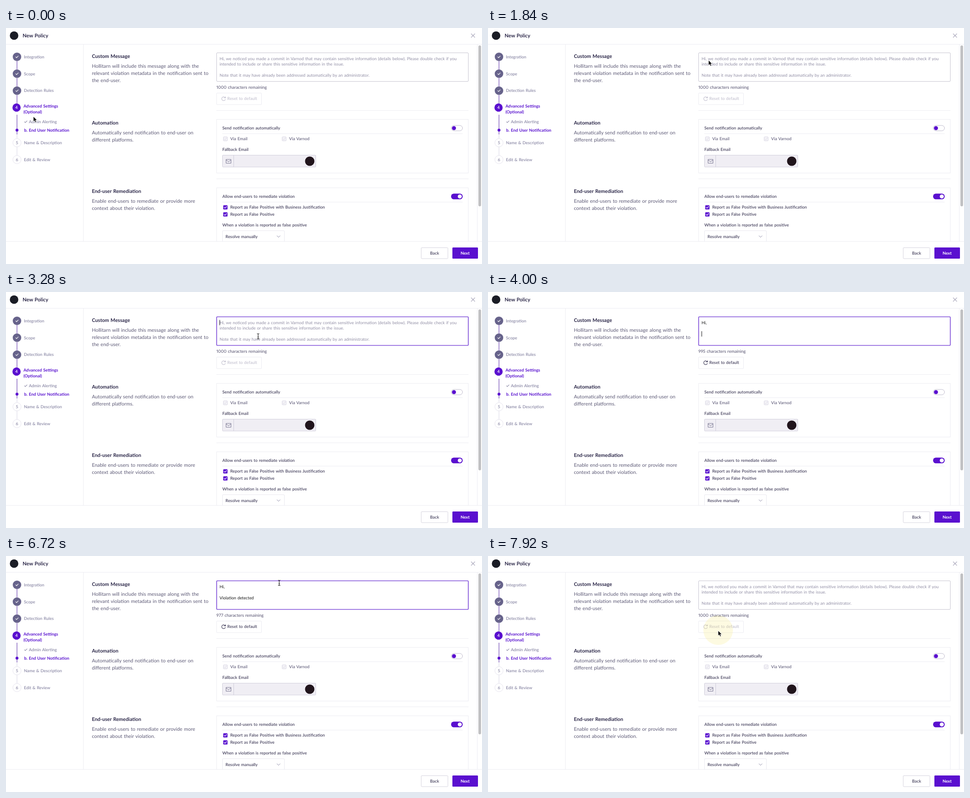
An HTML page for the animation above (8000 ms loop, 1061x528 px).

```html
<!DOCTYPE html>
<html lang="en">
<head>
<meta charset="utf-8">
<title>New Policy</title>
<style>
html, body { margin: 0; width: 100%; height: 100%; overflow: hidden; background: #fff; }
svg { display: block; width: 1061px; height: 528px; }
text {
  font: 600 9.3px Lato, "Open Sans", sans-serif;
  word-spacing: .07em; white-space: pre;
  text-rendering: geometricPrecision; fill: #47435f;
}
.line { fill: none; stroke: #ececf2; }
.head { font-size: 11.1px; font-weight: 700; fill: #2b2748; }
.title { font-size: 11.3px; }
.body { font-size: 10.95px; font-weight: 400; fill: #5d5a76; }
.nav { fill: #8b89a6; }
.now { fill: #5a14cf; font-weight: 700; }
.hint { font-size: 9.36px; font-weight: 400; fill: #918ea5; }
.typed { font-size: 9.36px; font-weight: 400; fill: #111; }
.count { font-size: 9.45px; font-weight: 500; font-variant-numeric: proportional-nums; fill: #5d5a76; }
.mid { text-anchor: middle; }
.fill { fill: #5a10cf; }
.tick { fill: none; stroke-width: 1.2; stroke-linecap: round; stroke-linejoin: round; }
</style>
</head>
<body>
<svg viewBox="0 0 1061 528" xmlns="http://www.w3.org/2000/svg">
  <defs>
    <path id="tick" d="M-2.8 .1L-.9 2 2.8 -1.9"/>
    <g id="done">
      <circle r="9.5" fill="#67638b"/>
      <use href="#tick" class="tick" stroke="#fff"/>
    </g>
    <g id="checked">
      <rect x="-4.8" y="-4.8" width="9.6" height="9.6" rx="1.6" class="fill"/>
      <use href="#tick" class="tick" stroke="#fff"/>
    </g>
    <g id="unchecked">
      <rect x="-4.5" y="-4.5" width="9" height="9" rx="1.5" fill="#f5f4f8" stroke="#d9d7e3"/>
      <use href="#tick" class="tick" stroke="#e3e1ea"/>
    </g>
    <clipPath id="pane"><rect x="173" y="37" width="878" height="440"/></clipPath>
  </defs>

  <!-- header and frame -->
  <circle cx="18" cy="17" r="9.5" fill="#1b1d26"/>
  <text class="head title" x="37" y="20.8">New Policy</text>
  <path d="M1036.7 12.7l8.6 8.6m0-8.6l-8.6 8.6" stroke="#a09eb4" stroke-width="1.2"/>
  <path class="line" d="M0 36.5H1061M172.5 37V477M0 477.5H1061M1050.5 37V477"/>
  <rect x="1053" y="39" width="6" height="360" rx="3" fill="#c1c1c3"/>

  <!-- steps -->
  <path d="M24.5 74V93M24.5 112V131M24.5 150V169M24.5 194V238" stroke="#7f5cbd" stroke-width="1.4"/>
  <path d="M24.5 238V247M24.5 266V285" stroke="#e3e1ec" stroke-width="1.4"/>
  <use href="#done" x="24.5" y="64.5"/>
  <use href="#done" x="24.5" y="102.3"/>
  <use href="#done" x="24.5" y="140.2"/>
  <circle cx="23.5" cy="178" r="9.2" class="fill"/>
  <circle cx="24.5" cy="228.5" r="3.2" class="fill"/>
  <circle cx="24.5" cy="256.7" r="9.2" fill="#fff" stroke="#e6e4ee"/>
  <circle cx="24.5" cy="294.5" r="9.2" fill="#fff" stroke="#e6e4ee"/>
  <text class="mid" x="23.5" y="181.3" style="fill:#fff">4</text>
  <text class="nav mid" x="24.5" y="260">5</text>
  <text class="nav mid" x="24.5" y="297.8">6</text>
  <text class="nav" x="40" y="67.7">Integration</text>
  <text class="nav" x="40" y="105.5">Scope</text>
  <text class="nav" x="40" y="143.4">Detection Rules</text>
  <text class="now" x="39" y="178">Advanced Settings</text>
  <text class="now" x="39" y="190.6">(Optional)</text>
  <use href="#tick" x="44" y="209.7" class="tick" stroke="#8b89a6"/>
  <text class="nav" x="51" y="212.8">Admin Alerting</text>
  <text class="now" x="40.5" y="231.7">b. End User Notification</text>
  <text class="nav" x="40" y="260">Name &amp; Description</text>
  <text class="nav" x="40" y="297.8">Edit &amp; Review</text>

  <!-- section descriptions -->
  <text class="head" x="191.5" y="66.9">Custom Message</text>
  <text class="body" x="191.5" y="89.2">Hollitarn will include this message along with the</text>
  <text class="body" x="191.5" y="105">relevant violation metadata in the notification sent to</text>
  <text class="body" x="191.5" y="120.8">the end-user.</text>
  <text class="head" x="191.5" y="216">Automation</text>
  <text class="body" x="191.5" y="238">Automatically send notification to end-user on</text>
  <text class="body" x="191.5" y="253.8">different platforms.</text>
  <text class="head" x="191.5" y="368.9">End-user Remediation</text>
  <text class="body" x="191.5" y="391">Enable end-users to remediate or provide more</text>
  <text class="body" x="191.5" y="406.8">context about their violation.</text>

  <!-- message -->
  <rect id="box" x="469.5" y="55.5" width="561" height="64" rx="1.5" fill="#fff"/>
  <g id="hint">
    <text class="hint" x="476" y="71.5">Hi, we noticed you made a commit in Varnod that may contain sensitive information (details below). Please double check if you</text>
    <text class="hint" x="476" y="84.1">intended to include or share this sensitive information in the issue.</text>
    <text class="hint" x="476" y="109.3">Note that it may have already been addressed automatically by an administrator.</text>
  </g>
  <text class="typed" id="first" x="476" y="71.5"></text>
  <text class="typed" id="third" x="476" y="96.7"></text>
  <rect id="caret" width="1" height="12" fill="#111"/>
  <text class="count" id="count" x="469" y="135.5"></text>
  <rect class="line" x="469.5" y="145.5" width="100" height="26" rx="1.5"/>
  <g id="reset">
    <path d="M488.6 156A4.2 4.2 0 1 0 489.1 159.4M489.3 153.3V156.4H486.2" fill="none" stroke="currentColor" stroke-width="1.2"/>
    <text x="493.3" y="161.4" style="fill:currentColor">Reset to default</text>
  </g>
  <path class="line" d="M469 184.5H1031M469 337.5H1031"/>

  <!-- automation -->
  <rect class="line" x="469.5" y="204.5" width="561" height="120"/>
  <path class="line" d="M482 236.5H1018"/>
  <text x="482.3" y="227">Send notification automatically</text>
  <rect x="992.5" y="218" width="25" height="12" rx="6" fill="#fff" stroke="#bcb9cb"/>
  <circle cx="998.5" cy="224" r="4.5" class="fill"/>
  <use href="#unchecked" x="489" y="248"/>
  <use href="#unchecked" x="620" y="248"/>
  <text x="499.7" y="251.3" style="fill:#6b6883">Via Email</text>
  <text x="631" y="251.3" style="fill:#6b6883">Via Varnod</text>
  <text x="482.3" y="275">Fallback Email</text>
  <rect x="482.5" y="284.5" width="208" height="26.5" rx="1.5" fill="#f0eef4" stroke="#d0cedb"/>
  <path d="M507.5 285V311" stroke="#d0cedb"/>
  <path d="M490.5 294H501.5V302.5H490.5ZM490.5 295.2L496 299.2 501.5 295.2" fill="none" stroke="#77748f" stroke-linejoin="round"/>
  <circle cx="677" cy="298" r="10.5" fill="#21151c"/>

  <!-- remediation -->
  <g clip-path="url(#pane)">
    <rect class="line" x="469.5" y="357.5" width="561" height="150"/>
    <path class="line" d="M482 389.5H1018"/>
    <text x="482.3" y="380">Allow end-users to remediate violation</text>
    <rect x="992" y="370.5" width="26" height="12.8" rx="6.4" class="fill"/>
    <circle cx="1011.5" cy="376.9" r="4.5" fill="#fff"/>
    <use href="#checked" x="489" y="401.2"/>
    <use href="#checked" x="489" y="417"/>
    <text x="499.7" y="404.4">Report as False Positive with Business Justification</text>
    <text x="499.7" y="420.2">Report as False Positive</text>
    <text x="482.3" y="443.6">When a violation is reported as false positive</text>
    <rect x="482.5" y="453.5" width="138" height="40" rx="1.5" fill="#fff" stroke="#e9e8ef"/>
    <text x="489.3" y="469.7">Resolve manually</text>
    <path d="M603.7 464.5L607.5 468.3 611.3 464.5" fill="none" stroke="#8b89a6"/>
  </g>

  <!-- footer -->
  <rect x="925.5" y="491.5" width="59.5" height="24.5" rx="1.5" fill="#fff" stroke="#d5d3de"/>
  <text class="mid" x="955.3" y="506.7">Back</text>
  <rect x="995" y="491" width="57" height="25" rx="1.5" class="fill"/>
  <text class="mid" x="1023.3" y="506.7" style="fill:#fff;font-weight:700">Next</text>

  <!-- pointer -->
  <circle id="ring" fill="#f5e56b"/>
  <path id="arrow" d="M0 0V11.4L2.6 9.1 4.4 13.2 6.5 12.3 4.7 8.3H8.2Z" fill="#000" stroke="#fff" stroke-width=".8"/>
  <path id="beam" d="M-2.6 -6Q-.4 -6 0 -4.8Q.4 -6 2.6 -6M0 -5V5M-2.6 6Q-.4 6 0 4.8Q.4 6 2.6 6M-1.3 1.8H1.3" fill="none" stroke="#111" stroke-width="1.1"/>
</svg>
<script>
const LOOP = 8000, STEP = 80;
const MESSAGE = "Hi,\n\nViolation detected";
// moment at which each character of the message lands
const KEYS = [3360, 3520, 3760, 3920, 4000, 4560, 4720, 4880, 4960, 5040, 5120, 5200,
  5280, 5360, 5520, 5600, 5680, 5680, 5840, 5920, 6000, 6000, 6080];
const PATH = [[0, 61, 198], [1840, 491.5, 72], [2000, 489, 76], [2080, 486, 76], [2560, 486, 76],
  [2960, 562, 99], [6560, 562, 99], [6720, 609, 60], [7040, 596, 80], [7680, 513, 167]];
const FOCUS = 2240, BLUR = 7840, CLEAR = 7920;
const CARET = [[2400, 2720], [3280, 4320], [4560, 6480], [7040, 7520]];
// click rings: start, end, x, y, radius, opacity
const RINGS = [[2240, 2320, 484, 71, 28, .35], [2320, 2400, 484, 71, 29.8, .41],
  [7840, 7920, 513, 166, 29.8, .41], [7920, 8000, 513, 166, 33, .2]];

const $ = id => document.getElementById(id);
const set = (el, attrs) => { for (const k in attrs) el.setAttribute(k, attrs[k]); };
const show = (el, on) => set(el, { visibility: on ? "visible" : "hidden" });
const within = (t, [from, to]) => t >= from && t < to;

function pointerAt(t) {
  const i = PATH.findIndex(p => p[0] > t);
  if (i < 0) return PATH[PATH.length - 1].slice(1);
  const [t0, x0, y0] = PATH[i - 1], [t1, x1, y1] = PATH[i];
  const u = (t - t0) / (t1 - t0), e = u * u * (3 - 2 * u);
  return [x0 + (x1 - x0) * e, y0 + (y1 - y0) * e];
}

function drawMessage(t) {
  const length = t < CLEAR ? KEYS.filter(k => k <= t).length : 0;
  const lines = MESSAGE.slice(0, length).split("\n");
  const fields = [$("first"), null, $("third")];
  fields.forEach((el, i) => { if (el) el.textContent = lines[i] || ""; });
  $("count").textContent = `${1000 - length} characters remaining`;
  $("reset").style.color = length ? "#47435f" : "#c6c4d2";
  show($("hint"), !length);

  const row = lines.length - 1;
  const width = lines[row] ? fields[row].getComputedTextLength() : 0;
  set($("caret"), { x: 476 + width, y: 62.5 + row * 12.6 });
  show($("caret"), CARET.some(span => within(t, span)));
}

function drawBox(t) {
  const focused = within(t, [FOCUS, BLUR]), settled = focused && t >= FOCUS + 160;
  set($("box"), {
    stroke: settled ? "#7d4bd8" : focused ? "#8359d2" : "#c6c4d0",
    "stroke-width": settled ? 1.7 : focused ? 1.2 : 1
  });
}

function drawPointer(t) {
  const [x, y] = pointerAt(t);
  const visible = t < KEYS[0] || t > 6560;
  const inBox = t >= 2000 && y < 120;
  for (const [id, on] of [["beam", inBox], ["arrow", !inBox]]) {
    set($(id), { transform: `translate(${x} ${y})` });
    show($(id), visible && on);
  }
  const ring = RINGS.find(span => within(t, span));
  show($("ring"), ring);
  if (ring) set($("ring"), { cx: ring[2], cy: ring[3], r: ring[4], opacity: ring[5] });
}

function frame() {
  const t = Math.floor(performance.now() % LOOP / STEP) * STEP;
  drawMessage(t);
  drawBox(t);
  drawPointer(t);
  requestAnimationFrame(frame);
}
frame();
</script>
</body>
</html>
```
